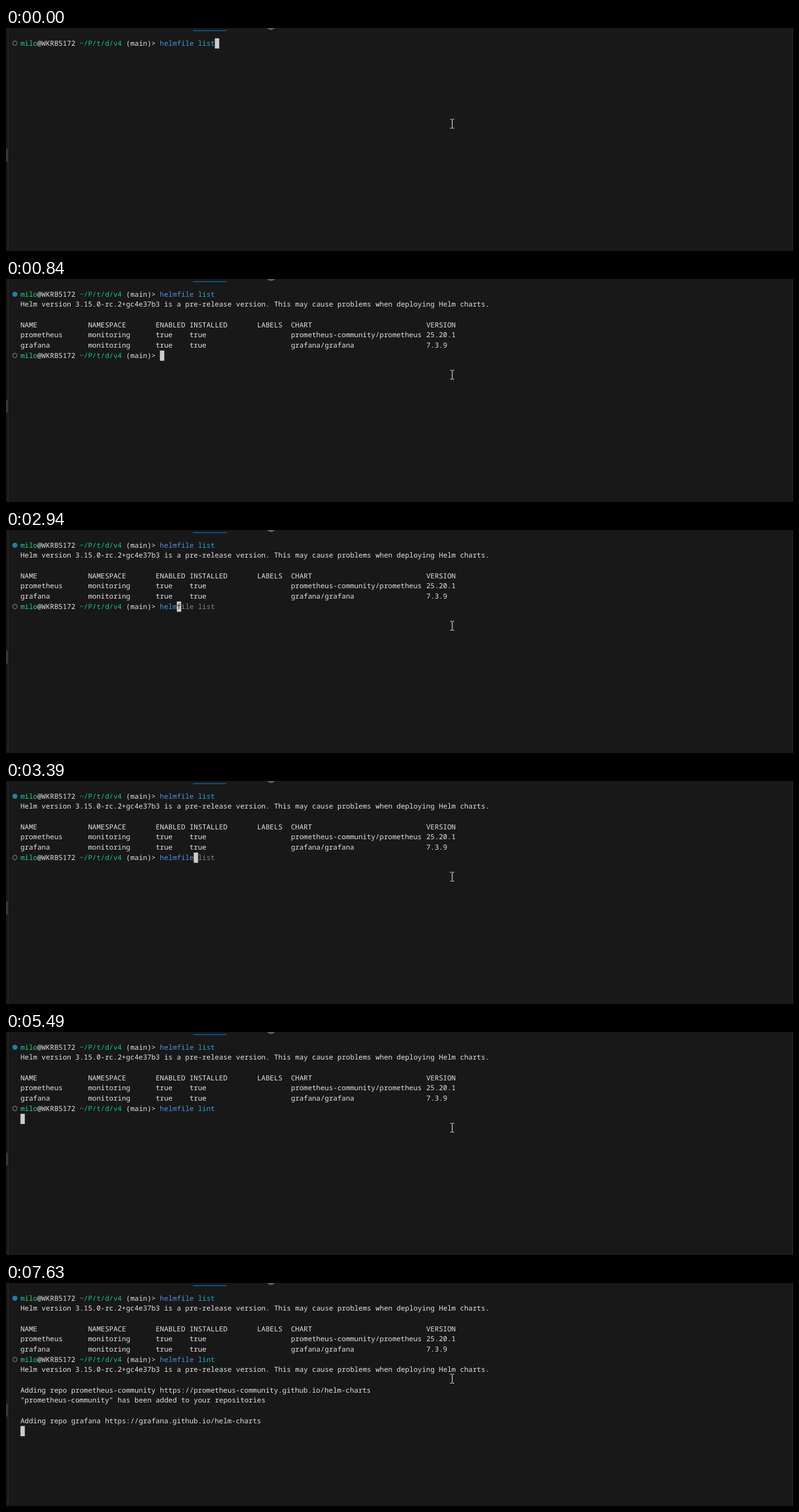
Write an HTML page with a canvas that moves like this. It is 1280 px wide and 364 px high and loops after 8 s.

```html
<!DOCTYPE html>
<html lang="en">
<head>
<meta charset="utf-8">
<title>helmfile terminal</title>
<style>
html, body { margin: 0; width: 100%; height: 100%; overflow: hidden; background: #181818; }
canvas { display: block; }
</style>
</head>
<body>
<canvas id="stage" width="1280" height="364"></canvas>
<script>
const ctx = document.getElementById('stage').getContext('2d', { alpha: false });

const LOOP = 8000;
const CELL = 6.874, LINE = 16.667, LEFT = 23.5, TOP = 16.8;
const PROMPT_ROW = 6, INPUT_COL = 33;
const C = {
  bg: '#181818', fg: '#e2e2e2', user: '#23d18b', path: '#16c282',
  command: '#4e92dc', arg: '#1fb0d4', hint: '#848484', error: '#f14c4c',
  cursor: '#cccccc', border: '#2b2b2b', done: '#1b81a8', idle: '#606060'
};

const WARNING = 'Helm version 3.15.0-rc.2+gc4e37b3 is a pre-release version. ' +
  'This may cause problems when deploying Helm charts.';
const TABLE_COLS = [0, 16, 32, 40, 56, 64, 96];
const TABLE = [
  ['NAME', 'NAMESPACE', 'ENABLED', 'INSTALLED', 'LABELS', 'CHART', 'VERSION'],
  ['prometheus', 'monitoring', 'true', 'true', '', 'prometheus-community/prometheus', '25.20.1'],
  ['grafana', 'monitoring', 'true', 'true', '', 'grafana/grafana', '7.3.9']
];

// Keystrokes: time, typed length, colour of the command word
const KEYS = [
  [840, 0, C.fg], [2390, 1, C.fg], [2520, 2, C.error], [2660, 3, C.error],
  [2940, 4, C.command], [3090, 6, C.error], [3240, 7, C.error],
  [3390, 8, C.command], [4650, 9, C.command], [4930, 10, C.command],
  [5080, 11, C.command], [5210, 12, C.command], [5360, 13, C.command]
];
const ENTER_FIRST = 430, LISTED = 840, ENTER_SECOND = 5490, ADD_FIRST = 5920, ADD_SECOND = 7630;

const colX = col => LEFT + col * CELL;
const rowY = row => TOP + row * LINE;

function rect(x, y, w, h, color) {
  ctx.fillStyle = color;
  ctx.fillRect(x, y, w, h);
}

// Each word starts on its own terminal cell
function print(row, col, text, color = C.fg) {
  ctx.fillStyle = color;
  for (const word of text.matchAll(/\S+/g)) {
    ctx.fillText(word[0], colX(col + word.index), Math.round(rowY(row) + 12));
  }
}

function cursor(row, col, under = '') {
  rect(colX(col), rowY(row), 7.1, LINE, C.cursor);
  print(row, col, under, C.bg);
}

function marker(row, done) {
  ctx.beginPath();
  ctx.arc(14.5, rowY(row) + 8.1, done ? 4.2 : 3.5, 0, Math.PI * 2);
  if (done) {
    ctx.fillStyle = C.done;
    ctx.fill();
  } else {
    ctx.strokeStyle = C.idle;
    ctx.lineWidth = 1.6;
    ctx.stroke();
  }
}

function prompt(row, done) {
  marker(row, done);
  print(row, 0, 'milo', C.user);
  print(row, 4, '@WKRB5172');
  print(row, 14, '~/P/t/d/v4', C.path);
  print(row, 25, '(main)>');
}

function command(row, text, color = C.command) {
  print(row, INPUT_COL, text.slice(0, 8), color);
  print(row, INPUT_COL + 8, text.slice(8), C.arg);
}

function typing(t) {
  const [, count, color] = KEYS.findLast(key => key[0] <= t);
  const line = count < 12 ? 'helmfile list' : 'helmfile lint';
  command(PROMPT_ROW, line.slice(0, count), color);
  if (count) print(PROMPT_ROW, INPUT_COL + count + 1, line.slice(count + 1), C.hint);
  cursor(PROMPT_ROW, INPUT_COL + count, count ? line.charAt(count) : '');
}

function listing() {
  print(1, 0, WARNING);
  TABLE.forEach((cells, i) =>
    cells.forEach((cell, j) => print(3 + i, TABLE_COLS[j], cell)));
}

function linting(t) {
  command(PROMPT_ROW, 'helmfile lint');
  if (t < ADD_FIRST) return cursor(7, 0);
  print(7, 0, WARNING);
  print(9, 0, 'Adding repo prometheus-community https://prometheus-community.github.io/helm-charts');
  if (t < ADD_SECOND) return cursor(10, 0);
  print(10, 0, '"prometheus-community" has been added to your repositories');
  print(12, 0, 'Adding repo grafana https://grafana.github.io/helm-charts');
  cursor(13, 0);
}

function panel() {
  rect(0, 0, 1280, 364, C.bg);
  rect(3, 0, 1, 364, C.border);
  rect(1279, 0, 1, 364, C.border);
  rect(0, 197, 3, 21, '#37373d');
  rect(0, 359, 3, 1, C.border);
  rect(304, 3.8, 55, 1.1, '#0078d4');
  ctx.fillStyle = '#616161';
  ctx.beginPath();
  ctx.arc(431, -5, 8.3, 0, Math.PI * 2);
  ctx.fill();
}

function pointer() {
  const ink = '#e8e8e8';
  for (const y of [148.5, 163]) {
    rect(722.5, y, 2.7, 1, ink);
    rect(726.3, y, 2.7, 1, ink);
  }
  rect(725.2, 149.5, 1.1, 13.5, ink);
}

function draw(t) {
  ctx.font = '500 11.457px "Noto Sans Mono", "DejaVu Sans Mono", monospace';
  ctx.textRendering = 'geometricPrecision';
  panel();
  prompt(0, t >= LISTED);
  command(0, 'helmfile list');
  if (t < ENTER_FIRST) {
    cursor(0, INPUT_COL + 13);
  } else if (t < LISTED) {
    cursor(1, 0);
  } else {
    listing();
    prompt(PROMPT_ROW, false);
    if (t < ENTER_SECOND) typing(t);
    else linting(t);
  }
  pointer();
}

function frame() {
  draw(performance.now() % LOOP);
  requestAnimationFrame(frame);
}
frame();
</script>
</body>
</html>
```
